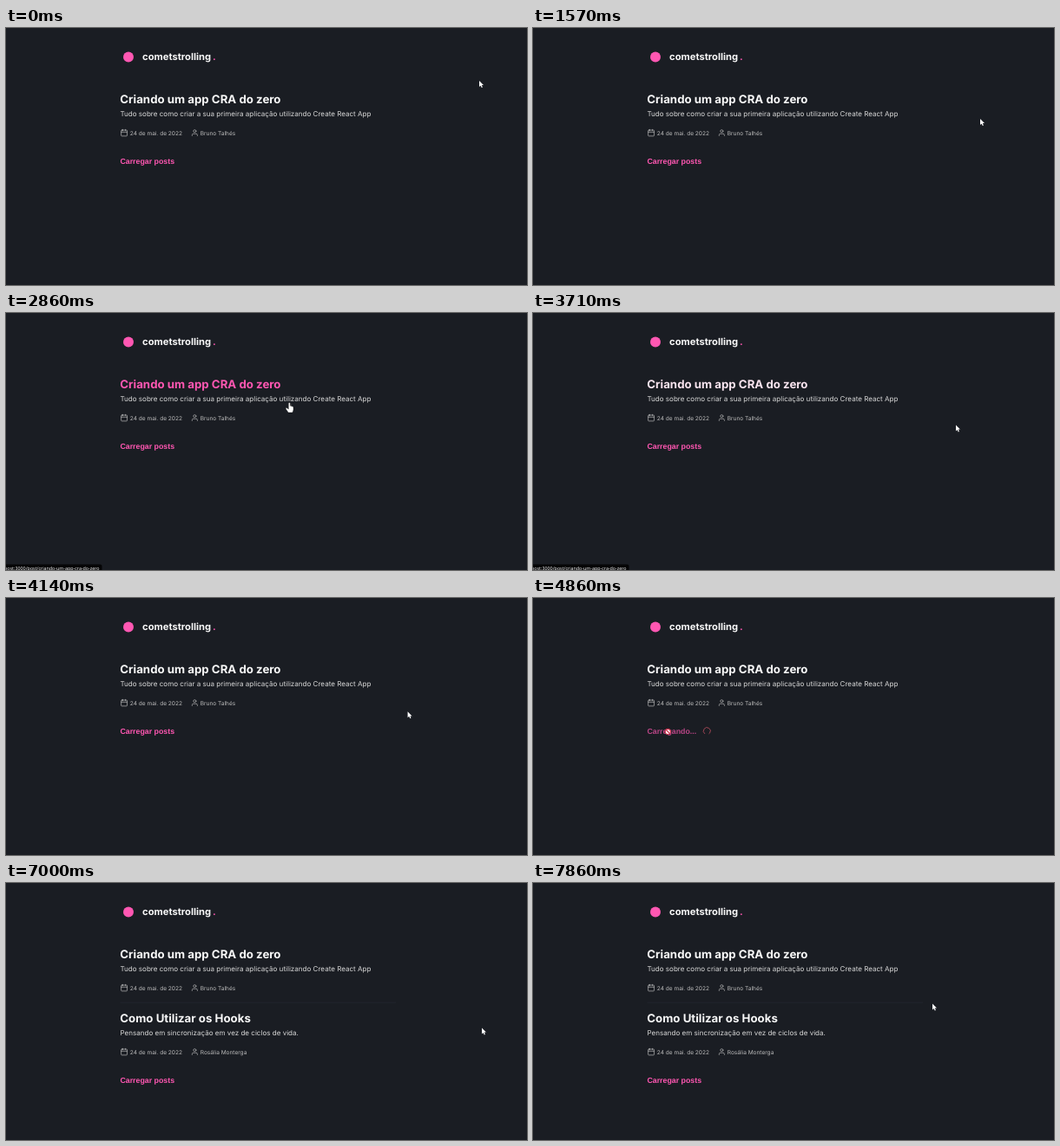
An HTML page for the animation above (8 s loop, 600x297 px).

```html
<!DOCTYPE html>
<html lang="pt-BR">
<head>
<meta charset="utf-8">
<title>Blog</title>
<style>
  html, body { margin: 0; width: 100%; height: 100%; overflow: hidden; background: #1a1d23; }
  svg { display: block; width: 100%; height: 100%; }
  text { font-family: Inter, sans-serif; text-rendering: geometricPrecision; white-space: pre; }
  .brand { font-size: 11.2px; font-weight: 700; fill: #f8f8f8; }
  .title { font-size: 13.28px; font-weight: 700; fill: #f8f8f8; }
  .lead { font-size: 8.06px; fill: #d7d7d7; }
  .info { font-size: 6.56px; fill: #bbb; }
  .more { font: 700 8.82px "Liberation Sans", Arial, sans-serif; fill: #ff57b2; }
  .url { font: 5.35px "Open Sans", sans-serif; fill: #fff; text-anchor: end; }
  .icon { fill: none; stroke: #bbb; stroke-width: 1.8; stroke-linecap: round; stroke-linejoin: round; }
</style>
</head>
<body>
<svg viewBox="0 0 600 297">
  <defs>
    <g id="calendar" class="icon">
      <rect x="3" y="4" width="18" height="18" rx="2"/>
      <path d="M16 2v4M8 2v4M3 10h18"/>
    </g>
    <g id="person" class="icon">
      <path d="M20 21v-2a4 4 0 0 0-4-4H8a4 4 0 0 0-4 4v2"/>
      <circle cx="12" cy="7" r="4"/>
    </g>
  </defs>
  <rect width="600" height="297" fill="#1a1d23"/>

  <circle cx="141" cy="33.5" r="6" fill="#ff57b2"/>
  <text class="brand" x="157.1" y="37.3">cometstrolling</text>
  <text class="brand" x="237.9" y="37.3" style="fill:#ff57b2">.</text>

  <g id="posts"></g>

  <g id="button">
    <text id="label" class="more" x="131.4" y="156.7"></text>
    <circle id="spinner" r="4" pathLength="360" stroke-dasharray="290 70"
            fill="none" stroke="#d8586a" stroke-width=".9"/>
  </g>

  <g id="status">
    <path d="M0 290.5H108.5q2 0 2 2V297H0Z" fill="#050506"/>
    <text class="url" x="107.6" y="296.6">localhost:3000/post/criando-um-app-cra-do-zero</text>
  </g>

  <g id="cursor">
    <path id="arrow" transform="translate(0 .4) scale(.86)" d="M0 0V8.2L1.9 6.5L3.2 9.3L4.5 8.7L3.3 6H5.8Z" fill="#fff"/>
    <path id="hand" d="M-1 1Q0-.8 1 1V4.2Q2-.2 2 4.4Q3 3.6 3.3 4.8Q4.6 4.3 4.7 5.8V8.4Q4.4 10 3.6 11.8H-1.2Q-2.4 9.8-4 7.6Q-4.4 6-2.8 6.4L-1 7.8Z" fill="#fff" stroke="#111" stroke-width=".4"/>
    <g id="blocked" fill="#fff" stroke="#d0304c" stroke-width="1.2">
      <circle r="3.1"/>
      <path d="M-2.1-2.1L2.1 2.1"/>
    </g>
  </g>
</svg>
<script>
const LOOP = 8000, STEPS = 56, POST_GAP = 74;
const CLICKED = 4800, LOADED = 6860;
const FADE = 320, STATUS_DELAY = 600;
const HOME = { x: 545, y: 60.5 };
const MOVES = [
  { from: 570, to: 1570, x: 515, y: 104.5 },
  { from: 1570, to: 2860, x: 326.3, y: 103.3 },
  { from: 2860, to: 3710, x: 487, y: 129 },
  { from: 4000, to: 4860, x: 155.3, y: 154.4 },
  { from: 5140, to: 6000, x: 548, y: 167 },
  { from: 7290, to: 7860, x: 460, y: 139 }
];
const POSTS = [
  { title: "Criando um app CRA do zero", author: "Bruno Talhés",
    lead: "Tudo sobre como criar a sua primeira aplicação utilizando Create React App" },
  { title: "Como Utilizar os Hooks", author: "Rosália Monterga",
    lead: "Pensando em sincronização em vez de ciclos de vida." }
];

const $ = id => document.getElementById(id);
const show = (id, on) => $(id).setAttribute("visibility", on ? "visible" : "hidden");
const lerp = (a, b, k) => a + (b - a) * k;
const ease = k => k * k * (3 - 2 * k);

$("posts").innerHTML = POSTS.map(({ title, lead, author }, i) => `
  <g id="post${i}" transform="translate(0 ${i * POST_GAP})">
    ${i ? '<path d="M131.5 64.2H449" stroke="#272a31" stroke-width=".6"/>' : ""}
    <text class="title" x="131.3" y="87.3">${title}</text>
    <text class="lead" x="131.5" y="102.2">${lead}</text>
    <use href="#calendar" transform="translate(131.5 116.5) scale(.38)"/>
    <text class="info" x="142.8" y="123.5">24 de mai. de 2022</text>
    <use href="#person" transform="translate(212.8 116.5) scale(.38)"/>
    <text class="info" x="223.8" y="123.5">${author}</text>
  </g>`).join("");
const firstTitle = document.querySelector("#post0 .title");

function pointer(t) {
  return MOVES.reduce((p, { from, to, x, y }) => {
    const k = ease(Math.min(1, Math.max(0, (t - from) / (to - from))));
    return { x: lerp(p.x, x, k), y: lerp(p.y, y, k) };
  }, HOME);
}

const overPost = ({ x, y }) => x < 449 && y > 77 && y < 127;
const overButton = ({ x, y }) => x < 195 && y > 147 && y < 160;

// Share of the last `span` ms that the pointer spent on the post.
function recentHover(t, span, samples = 16) {
  let hits = 0;
  for (let i = 0; i < samples; i++) hits += overPost(pointer(t - span * i / samples));
  return hits / samples;
}

function render(elapsed) {
  const step = Math.floor((elapsed % LOOP + 5) / LOOP * STEPS) % STEPS;
  const t = step * LOOP / STEPS;
  const p = pointer(t);
  const loaded = t >= LOADED, loading = t >= CLICKED && !loaded;
  const blocked = loading && overButton(p);
  const hand = !blocked && (overPost(p) || overButton(p));

  const pink = recentHover(t, FADE) * 100;
  firstTitle.style.fill = `color-mix(in srgb, #ff57b2 ${pink}%, #f8f8f8)`;
  show("post1", loaded);
  show("status", recentHover(t, STATUS_DELAY) > 0);

  $("button").setAttribute("transform", `translate(0 ${loaded ? POST_GAP : 0})`);
  $("button").setAttribute("opacity", loading ? .7 : 1);
  $("label").textContent = loading ? "Carregando..." : "Carregar posts";
  show("spinner", loading);
  const turn = 125 + (t - CLICKED - 57) * .36;
  $("spinner").setAttribute("transform", `translate(200.3 153.7) rotate(${turn})`);

  $("cursor").setAttribute("transform", `translate(${p.x} ${p.y})`);
  show("arrow", !hand && !blocked);
  show("hand", hand);
  show("blocked", blocked);
}

const start = performance.now();
function tick() {
  render(performance.now() - start);
  requestAnimationFrame(tick);
}
tick();
</script>
</body>
</html>
```
